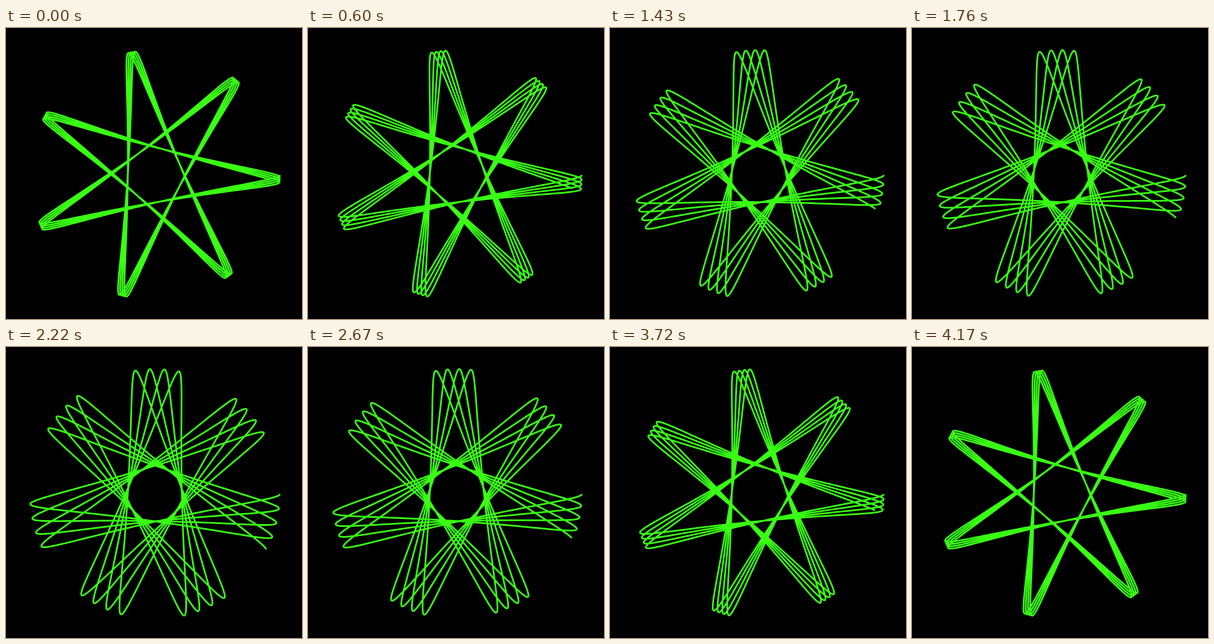
Write an HTML page with a canvas that moves like this. It is 520 by 511 pixels and loops after 4.2 s.

```html
<!DOCTYPE html>
<html lang="en">
<head>
<meta charset="utf-8">
<title>Spirograph</title>
<style>
  html, body { margin: 0; height: 100%; overflow: hidden; background: #000; }
  canvas { display: block; }
</style>
</head>
<body>
<canvas id="stage" width="520" height="511"></canvas>
<script>
const ctx = document.getElementById('stage').getContext('2d');
const LOOP = 4200, REST = 70, PEAK = 2220;
const CX = 261.5, CY = 258.2;
const ARM = 133.5, PEN = 86;
const STEP = 0.05, LENGTH = 99.97;
const LOW = 0.7513, HIGH = 0.7582;

// Speed of the arm relative to the pen: eases up, then falls evenly.
function ratioAt(time) {
  const rise = Math.max(0, time - REST) / (PEAK - REST);
  const fall = (LOOP - time) / (LOOP - PEAK);
  return LOW + (HIGH - LOW) * (time < PEAK ? rise ** 1.2 : fall);
}

function draw(ratio) {
  ctx.fillStyle = '#000';
  ctx.fillRect(0, 0, 520, 511);
  ctx.strokeStyle = '#39ff14';
  ctx.lineWidth = 3;
  ctx.lineJoin = 'round';
  ctx.beginPath();
  for (let a = 0; a < LENGTH; a += STEP) {
    ctx.lineTo(
      CX + ARM * Math.cos(ratio * a) + PEN * Math.cos(a),
      CY + ARM * Math.sin(ratio * a) - PEN * Math.sin(a)
    );
  }
  ctx.stroke();
}

const start = performance.now();
function frame() {
  draw(ratioAt((performance.now() - start) % LOOP));
  requestAnimationFrame(frame);
}
frame();
</script>
</body>
</html>
```
